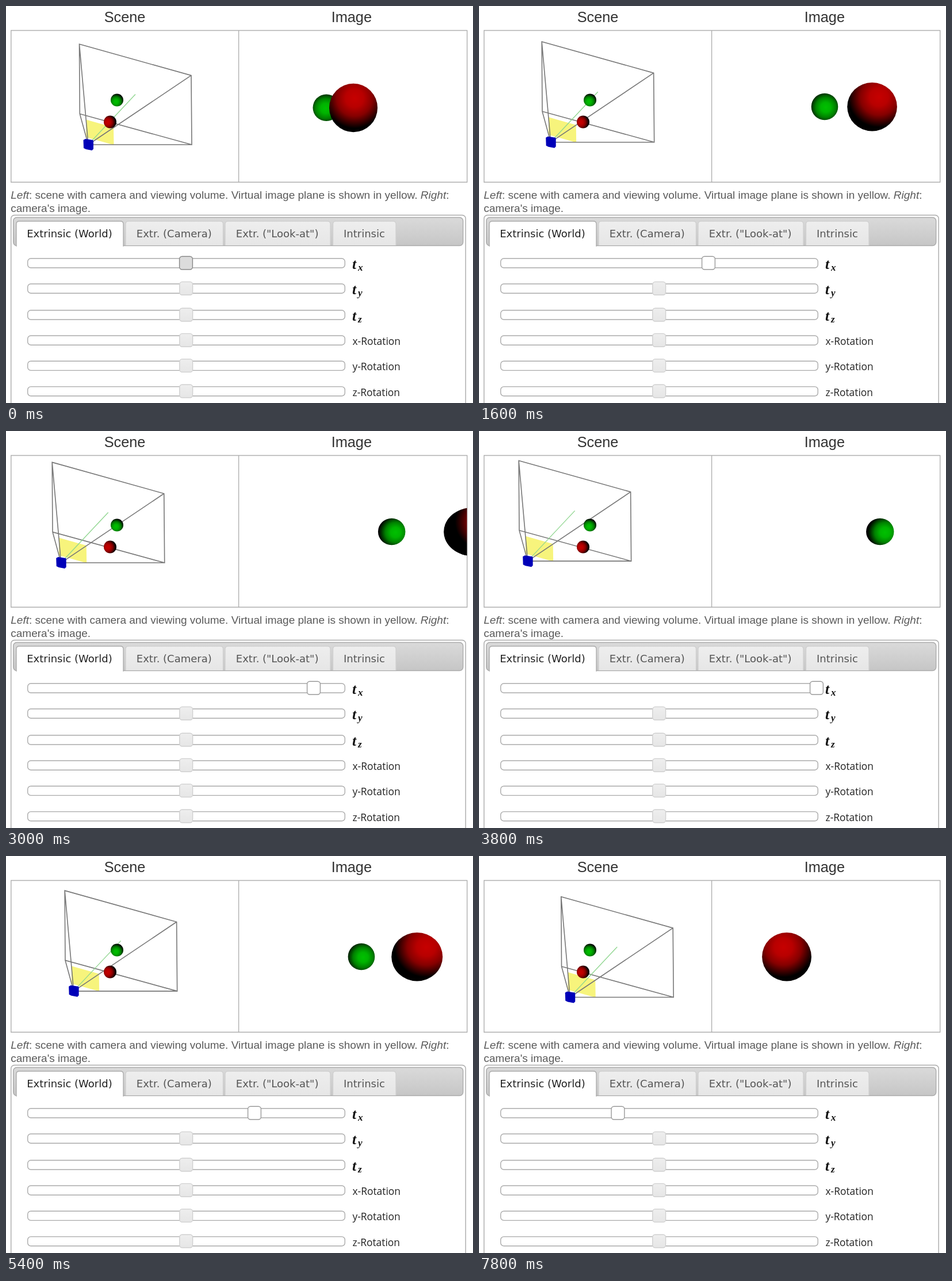
An HTML page for the animation above (8000 ms loop, 812 by 690 pixels).

```html
<!DOCTYPE html>
<html lang="en">
<head>
<meta charset="utf-8">
<title>Camera parameters</title>
<style>
html, body { margin: 0; width: 100%; height: 100%; overflow: hidden; background: #fff; }
svg { display: block; width: 100%; height: 100%; }
.head { font: 25.3px "Liberation Sans", Arial, sans-serif; fill: #333; text-anchor: middle; }
.note { font: 19px "Liberation Sans", Arial, sans-serif; fill: #5a5a5a; }
.note tspan { font-style: italic; }
.tab { font: 18px "DejaVu Sans", Verdana, sans-serif; fill: #555; }
.tab.on { fill: #212121; }
.label { font: 17.4px "Open Sans", "Noto Sans", sans-serif; fill: #222; }
.math { font: italic bold 25.5px "Liberation Serif", serif; fill: #111; }
.math tspan { font-size: 17px; }
.knob { fill: url(#tabFill); stroke: #d0d0d0; }
.knob.hover { fill: #dcdcdc; stroke: #888; }
.knob.drag { fill: #fff; stroke: #999; }
</style>
</head>
<body>
<svg viewBox="0 0 812 690" xmlns="http://www.w3.org/2000/svg">
  <defs>
    <linearGradient id="barFill" x2="0" y2="1"><stop stop-color="#dadada"/><stop offset="1" stop-color="#c6c6c6"/></linearGradient>
    <linearGradient id="tabFill" x2="0" y2="1"><stop stop-color="#eee"/><stop offset="1" stop-color="#e6e6e6"/></linearGradient>
    <clipPath id="imageClip"><rect x="405" y="43" width="396.5" height="263"/></clipPath>
  </defs>
  <text class="head" x="206.5" y="28">Scene</text>
  <text class="head" x="600.8" y="28">Image</text>
  <path d="M8.8 42.5H801.7V306.2H8.8ZM404.6 42.5V306" fill="none" stroke="#b0b0b0" stroke-width="1.4"/>

  <g id="rig">
    <path d="M139.2 198L187 211.5 187.5 242 139.3 228.5Z" fill="#f7f47c"/>
    <path d="M127.5 66.8L322 121.2 323 241.5 128.3 188ZM143 241.5L127.5 66.8M143 241.5L322 121.2M143 241.5H323M143 241.5L128.3 188" fill="none" stroke="#777" stroke-width="1.6"/>
    <path d="M148 236L225 154" stroke="#8fd68f" stroke-width="1.3"/>
  </g>
  <g id="balls"></g>
  <path id="cube" d="M134.5 233.5L138 231.5 151 233.5 152 235 152 249 149.5 251.5 139 249.5 135 247.5Z" fill="#0000b8"/>
  <g id="view" clip-path="url(#imageClip)"></g>

  <text class="note" x="8.3" y="334.7"><tspan>Left</tspan>: scene with camera and viewing volume. Virtual image plane is shown in yellow. <tspan>Right</tspan>:</text>
  <text class="note" x="8.3" y="357.6">camera's image.</text>

  <rect x="8.7" y="363.5" width="790.5" height="360" rx="6" fill="#fff" stroke="#aaa" stroke-width="1.4"/>
  <rect x="12.7" y="367.5" width="782" height="49" rx="6" fill="url(#barFill)" stroke="#aaa" stroke-width="1.4"/>
  <g id="tabs"></g>
  <g id="sliders"></g>
</svg>
<script>
const $ = id => document.getElementById(id);
function add(parent, tag, attrs, html = "") {
  const el = document.createElementNS("http://www.w3.org/2000/svg", tag);
  set(el, attrs);
  el.innerHTML = html;
  return parent.appendChild(el);
}
function set(el, attrs) {
  for (const k in attrs) el.setAttribute(k, attrs[k]);
}

// Tabs: left, right, text start, title
[[18, 204, 36.2, "Extrinsic (World)"], [208, 377.5, 226.8, "Extr. (Camera)"],
 [381, 564, 399.8, 'Extr. ("Look-at")'], [568.5, 678, 587, "Intrinsic"]].forEach(([l, r, x, title], i) => {
  const base = i ? 416 : 418;
  add($("tabs"), "path", {
    d: `M${l} ${base}V379Q${l} 374 ${l + 5} 374H${r - 5}Q${r} 374 ${r} 379V${base}`,
    fill: i ? "url(#tabFill)" : "#fff", stroke: i ? "#d0d0d0" : "#aaa", "stroke-width": 1.3
  });
  add($("tabs"), "text", { class: i ? "tab" : "tab on", x, y: 402 }, title);
});

// Sliders: label and vertical centre
const knobs = [["x", 446.6], ["y", 490.8], ["z", 536.6], ["x-Rotation", 580.8], ["y-Rotation", 625], ["z-Rotation", 669.4]]
  .map(([name, y], i) => {
    const g = $("sliders");
    add(g, "rect", { x: 37.7, y: y - 7.8, width: 551.6, height: 16.2, rx: 5.5, fill: "#fff", stroke: "#aaa", "stroke-width": 1.4 });
    if (i < 3) add(g, "text", { class: "math", x: 602, y: y + 10.6 }, `t<tspan x="612" dy="2.8">${name}</tspan>`);
    else add(g, "text", { class: "label", x: 602.5, y: y + 8.2 }, name);
    return add(g, "rect", { class: "knob", x: 301.8, y: y - 11.4, width: 22.8, height: 22.8, rx: 4.5, "stroke-width": 1.4 });
  });

// A lit ball; the highlight offset is in radii
function ball(parent, id, rgb, r) {
  const light = add(document.querySelector("defs"), "radialGradient", { id, r: 0.62 },
    [[0, 1], [0.3, 0.93], [0.6, 0.67], [0.85, 0.25], [1, 0]].map(([at, k]) =>
      `<stop offset="${at}" stop-color="rgb(${rgb.map(c => c * k)})"/>`).join(""));
  const el = add(parent, "ellipse", { fill: `url(#${id})`, ry: r });
  return (cx, cy, rx, ox, oy) => {
    set(el, { cx, cy, rx });
    set(light, { cx: 0.5 + ox / 2, cy: 0.5 + oy / 2 });
  };
}
const RED = [198, 0, 0], GREEN = [0, 192, 0];
ball($("balls"), "sceneGreen", GREEN, 11)(193, 163.5, 11, -0.15, 0.25);
ball($("balls"), "sceneRed", RED, 11)(181, 201.5, 11, -0.35, 0.05);
const green = ball($("view"), "viewGreen", GREEN, 23.3);
const red = ball($("view"), "viewRed", RED, 42.2);

// Slider position over time, [ms, x]
const LOOP = 8000, STEP = 200, HOME = 313;
const path = [[0, 313], [200, 313], [400, 319], [1400, 378], [1600, 399], [2600, 484], [3000, 535], [3800, 587],
  [4000, 572], [4400, 506], [5000, 469], [5400, 432], [6200, 341], [6600, 317], [7400, 282], [7800, 241.5]];

function slide(t) {
  const i = Math.max(1, path.findIndex(p => p[0] >= t));
  const [t0, x0] = path[i - 1], [t1, x1] = path[i];
  return x0 + (x1 - x0) * (t - t0) / (t1 - t0);
}

function draw(now) {
  const t = Math.floor(now % LOOP / STEP) * STEP;
  const rest = t < 400, x = slide(t), d = x - HOME;
  set(knobs[0], { x: x - 11.4, class: rest ? "knob hover" : "knob drag" });
  set(knobs[1], { class: t === 6600 ? "knob hover" : "knob" });

  const shift = `translate(${-0.213 * d} ${-0.056 * d - (rest ? 0.5 : 0)})`;
  set($("rig"), { transform: shift });
  set($("cube"), { transform: shift });

  // Perspective widens a ball as it leaves the image centre
  const y = rest ? 177 : 175.2, gx = 557 + 0.512 * d, rx = (rest ? 604 : 602.5) + 0.943 * d;
  green(gx, y - 0.2, 23.3 + 0.0001 * (gx - 603) ** 2, 0.0015 * d - 0.05, 0.05);
  red(rx, y, 42 + 0.0002 * (rx - 603) ** 2, 0.0026 * d + 0.05, -0.4);
}

const start = performance.now();
function tick() {
  draw(performance.now() - start);
  requestAnimationFrame(tick);
}
tick();
</script>
</body>
</html>
```
